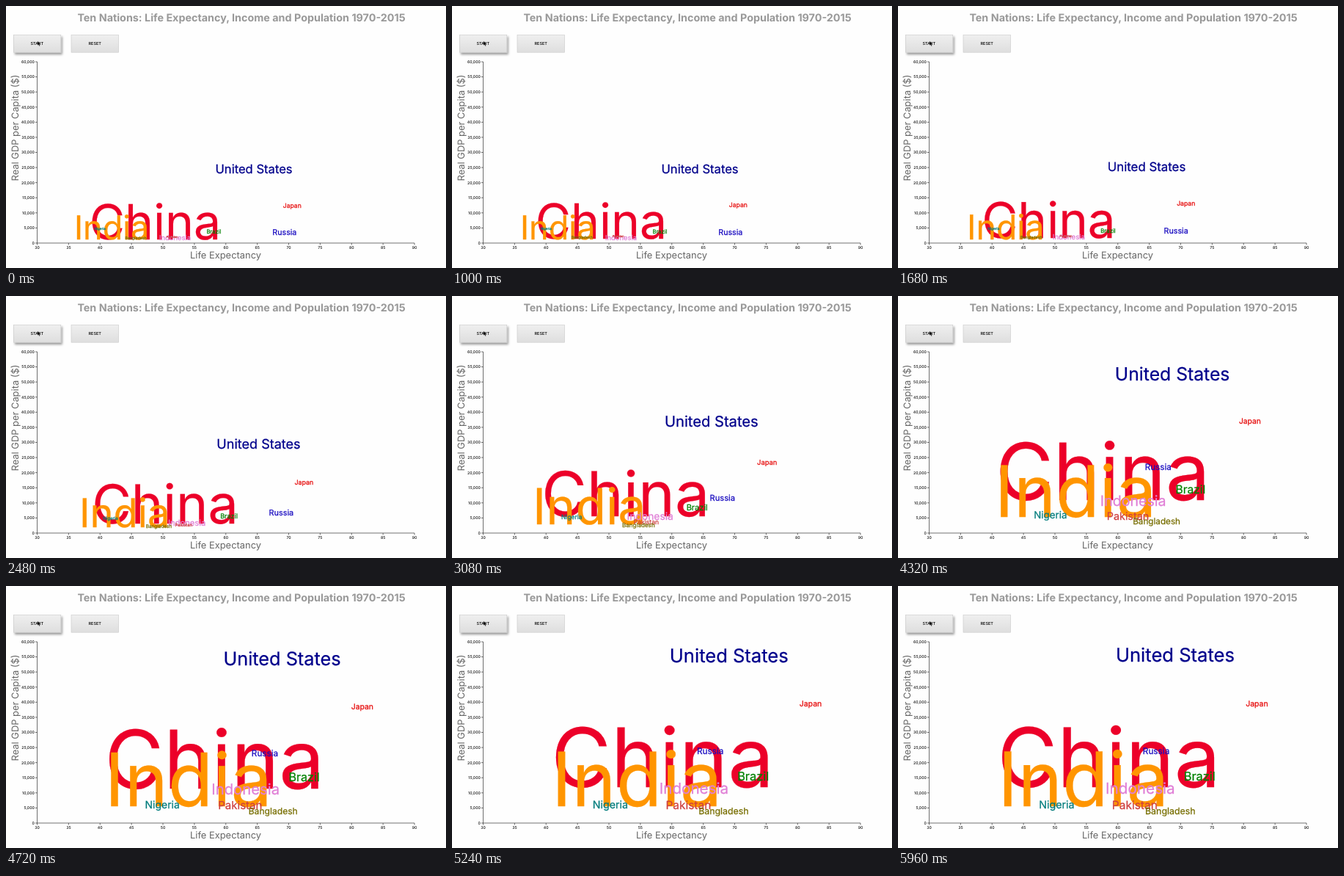
An HTML page for the animation above (6 s loop, 600x357 px).

```html
<!DOCTYPE html>
<html lang="en">
<head>
<meta charset="utf-8">
<title>Ten Nations</title>
<style>
  html, body { margin: 0; width: 100%; height: 100%; overflow: hidden; background: #fefefe; }
  svg { display: block; width: 600px; height: 357px; }
  text { font-family: Inter, Roboto, sans-serif; font-optical-sizing: none; text-rendering: geometricPrecision; }
  .mid { text-anchor: middle; }
  .name { font-size: 12.9px; fill: #666; text-anchor: middle; }
  .tick { font-size: 5.2px; font-weight: 500; fill: #111; }
  .button { font-size: 5.5px; font-weight: 500; fill: #000; text-anchor: middle; }
  .axis { fill: none; stroke: #333; stroke-width: .7; }
  #nations text { stroke-width: .25px; }
</style>
</head>
<body>
<svg viewBox="0 0 600 357">
  <defs>
    <linearGradient id="face" x2="0" y2="1">
      <stop stop-color="#efefef"/><stop offset="1" stop-color="#dedede"/>
    </linearGradient>
    <filter id="shadow" x="-20%" y="-30%" width="150%" height="180%">
      <feDropShadow dx="1.8" dy="2.5" stdDeviation="1.6" flood-opacity=".4"/>
    </filter>
  </defs>
  <text class="mid" x="321" y="21" font-size="14.35" font-weight="700" fill="#999">Ten Nations: Life Expectancy, Income and Population 1970-2015</text>
  <g fill="url(#face)" stroke="#c8c8c8" stroke-width=".6">
    <rect x="10.3" y="39.6" width="64.5" height="23.6" filter="url(#shadow)"/>
    <rect x="89" y="39.6" width="64.5" height="23.6"/>
  </g>
  <text class="button" x="42.3" y="52.6">START</text>
  <text class="button" x="121.2" y="52.6">RESET</text>
  <path d="M43 47.8v6l1.4-1.2 1 2.2 1-.5-1-2.1h1.8z" fill="#000" stroke="#fff" stroke-width=".2"/>
  <g id="axes"></g>
  <text class="name" x="299.5" y="343.5">Life Expectancy</text>
  <text class="name" transform="translate(17 166) rotate(-90)">Real GDP per Capita ($)</text>
  <g id="nations"></g>
</svg>
<script>
const LOOP = 6000, START = 765, DURATION = 5000;
const LEFT = 42.5, RIGHT = 557, TOP = 76, BOTTOM = 323;

// name, colour, then [x, baseline, font size] at the start and at the end
const nations = [
  ['China', '#ec0029', [113.7, 317.5, 66], [135.4, 274, 112]],
  ['India', '#ff9500', [93, 318, 45], [136, 299.5, 102.5]],
  ['United States', '#00008b', [285.5, 228, 16.6], [296.9, 103, 25.6]],
  ['Indonesia', '#e07fd6', [209, 319, 9.4], [283, 283, 20.7]],
  ['Pakistan', '#cf4040', [218.7, 315.5, 4], [291.8, 303.5, 15.5]],
  ['Brazil', '#008000', [273.4, 310, 7.6], [389.7, 264.5, 16.4]],
  ['Nigeria', '#007c7c', [120.6, 305, 4.5], [192.2, 303, 14.3]],
  ['Bangladesh', '#776e00', [162.6, 317.5, 5.25], [337, 310.5, 12.4]],
  ['Russia', '#1a0cc0', [363.3, 312, 10.7], [333.8, 229, 11.8]],
  ['Japan', '#e60a0a', [377.8, 274.5, 8.6], [474.2, 163.5, 10.5]],
];

function add(parent, tag, attrs, text = '') {
  const node = document.createElementNS('http://www.w3.org/2000/svg', tag);
  for (const key in attrs) node.setAttribute(key, attrs[key]);
  node.textContent = text;
  return parent.appendChild(node);
}

const axes = document.getElementById('axes');
let path = `M${LEFT} ${TOP}V${BOTTOM}H${RIGHT}`;
for (let i = 0; i <= 12; i++) {
  const x = LEFT + (RIGHT - LEFT) * i / 12;
  const y = BOTTOM + (TOP - BOTTOM) * i / 12;
  path += `M${x} ${BOTTOM}v2.6M${LEFT} ${y}h-2.6`;
  add(axes, 'text', { class: 'tick', x, y: 330.7, 'text-anchor': 'middle' }, 30 + i * 5);
  add(axes, 'text', { class: 'tick', x: 38.9, y: y + 1.9, 'text-anchor': 'end' },
    (i * 5000).toLocaleString('en-US'));
}
add(axes, 'path', { class: 'axis', d: path });

const group = document.getElementById('nations');
const labels = nations.map(([name, fill]) => add(group, 'text', { fill, stroke: fill }, name));

const ease = t => t < .5 ? 4 * t ** 3 : 1 - 4 * (1 - t) ** 3;

function draw(time) {
  const p = ease(Math.min(1, Math.max(0, (time % LOOP - START) / DURATION)));
  nations.forEach(([, , from, to], i) => {
    const [x, y, size] = from.map((v, k) => v + (to[k] - v) * p);
    labels[i].setAttribute('x', x);
    labels[i].setAttribute('y', y);
    labels[i].setAttribute('font-size', size);
  });
}

const begin = performance.now();
function tick() {
  draw(performance.now() - begin);
  requestAnimationFrame(tick);
}
tick();
</script>
</body>
</html>
```
